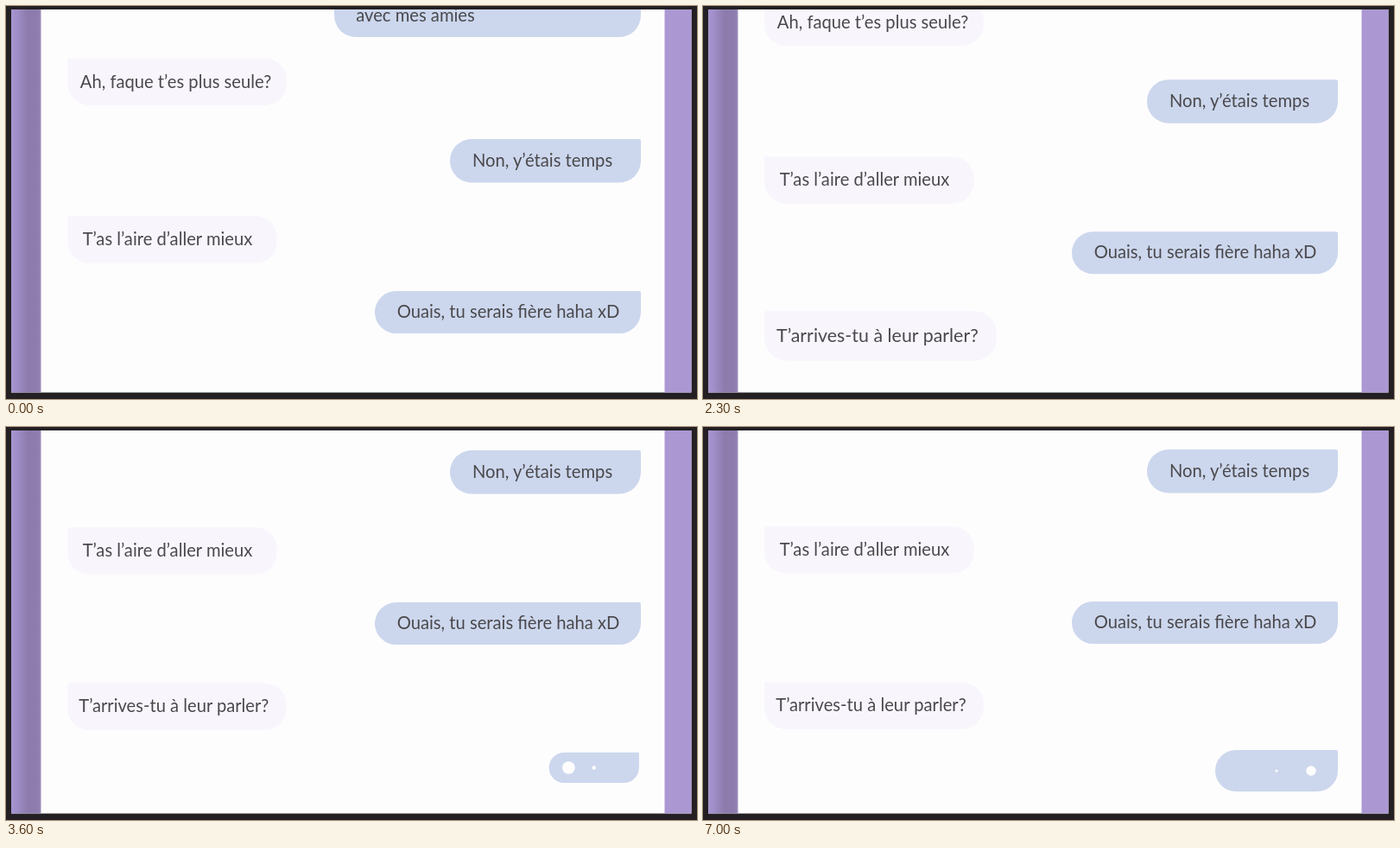
Write an HTML page that moves like this. It is 800x455 px and loops after 7100 ms.

```html
<!DOCTYPE html>
<html lang="fr">
<head>
<meta charset="utf-8">
<title>Conversation</title>
<style>
  html, body { margin: 0; width: 100%; height: 100%; overflow: hidden; background: #231f22; }
  svg { display: block; width: 100%; height: 100%; }
  text { font: 20.2px Lato, "Open Sans", sans-serif; fill: #4a484c; text-anchor: middle; }
</style>
</head>
<body>
<svg viewBox="0 0 800 455" xmlns="http://www.w3.org/2000/svg">
  <defs>
    <linearGradient id="edge">
      <stop offset="0" stop-color="#a695d0"/>
      <stop offset=".2" stop-color="#9f8ec8"/>
      <stop offset=".55" stop-color="#8c7bab"/>
      <stop offset=".9" stop-color="#8d7cad"/>
      <stop offset="1" stop-color="#9a8bb6"/>
    </linearGradient>
    <clipPath id="screen"><rect x="6" y="4" width="787.5" height="443.5"/></clipPath>
  </defs>
  <rect width="800" height="455" fill="#231f22"/>
  <g clip-path="url(#screen)">
    <rect x="6" y="4" width="788" height="444" fill="#fefdfe"/>
    <rect x="6" y="4" width="34.5" height="444" fill="url(#edge)"/>
    <rect x="762.5" y="4" width="32" height="444" fill="#ab98d3"/>
    <g id="chat"></g>
  </g>
</svg>
<script>
const LOOP = 7100, SCROLL = 128;
const chat = document.getElementById('chat');

function add(parent, tag, attrs, content = '') {
  const el = document.createElementNS('http://www.w3.org/2000/svg', tag);
  for (const key in attrs) el.setAttribute(key, attrs[key]);
  el.textContent = content;
  return parent.appendChild(el);
}

// Rounded bubble with one sharp upper corner on the sender's side.
function bubble(x1, y1, x2, y2, mine) {
  const group = add(chat, 'g', {});
  const r = Math.min(25, (y2 - y1) / 2);
  const tl = mine ? r : 2, tr = mine ? 2 : r;
  const arc = (radius, x, y) => `A${radius} ${radius} 0 0 1 ${x} ${y}`;
  add(group, 'path', {
    fill: mine ? '#ccd7ed' : '#f8f6fc',
    d: `M${x1 + tl} ${y1}H${x2 - tr}${arc(tr, x2, y1 + tr)}V${y2 - r}${arc(r, x2 - r, y2)}` +
       `H${x1 + r}${arc(r, x1, y2 - r)}V${y1 + tl}${arc(tl, x1 + tl, y1)}Z`
  });
  return group;
}

function message(text, x, y, box, mine) {
  const group = bubble(...box, mine);
  add(group, 'text', { x, y }, text);
  return group;
}

message('avec mes amies', 474, 18, [380, -40, 735, 36], true);
message('Ah, faque t’es plus seule?', 196.5, 95, [71, 60.5, 325, 115], false);
message('Non, y’étais temps', 621, 186, [514, 154, 735, 204.5], true);
message('T’as l’aire d’aller mieux', 187, 276.5, [71, 243, 314, 297.5], false);
message('Ouais, tu serais fière haha xD', 581.5, 361, [427, 330, 735, 379], true);
const reply = message('T’arrives-tu à leur parler?', 194.5, 457.5, [71, 423.5, 325, 478], false);
const typing = bubble(593, 502, 735, 550, true);
const dots = [624, 664, 704].map(cx => add(typing, 'circle', { cx, cy: 526, fill: '#fefdfe' }));
const dotDelays = [0, 115, 170];

const clamp = v => Math.min(1, Math.max(0, v));

// Cubic bezier easing (1/3, 0, 0.1, 1)
function ease(x) {
  let lo = 0, hi = 1;
  for (let i = 0; i < 24; i++) {
    const s = (lo + hi) / 2, q = 1 - s;
    if (q * q * s + 0.3 * q * s * s + s * s * s < x) lo = s; else hi = s;
  }
  return lo * lo * (3 - 2 * lo);
}

const progress = (t, start, duration) => ease(clamp((t - start) / duration));

function springScale(t) {
  const rise = clamp((t - 1900) / 220);
  if (rise < 1) return 1 - (1 - rise) ** 2;
  const s = (t - 2120) / 1000;
  return 1 + 0.1 * Math.exp(-2.75 * s) * Math.sin(Math.PI * s / 0.4);
}

function dotRadius(t, delay) {
  if (t < 3415) return 0;
  const x = ((t - 3415) % 785 - delay) / 380;
  return x > 0 && x < 1 ? 10 * Math.sin(Math.PI * x) ** 2 : 0;
}

function scaleAt(el, x, y, scale) {
  el.setAttribute('visibility', scale > 0.001 ? 'visible' : 'hidden');
  el.setAttribute('transform', `translate(${x} ${y}) scale(${scale}) translate(${-x} ${-y})`);
}

function draw(t) {
  chat.setAttribute('transform', `translate(0 ${-SCROLL * progress(t, 1605, 2300)})`);
  scaleAt(reply, 71, 451, springScale(t));
  scaleAt(typing, 727, 509, progress(t, 3150, 1100));
  dots.forEach((dot, i) => dot.setAttribute('r', dotRadius(t, dotDelays[i])));
}

const begin = performance.now();
function tick() {
  draw((performance.now() - begin) % LOOP);
  requestAnimationFrame(tick);
}
tick();
</script>
</body>
</html>
```
